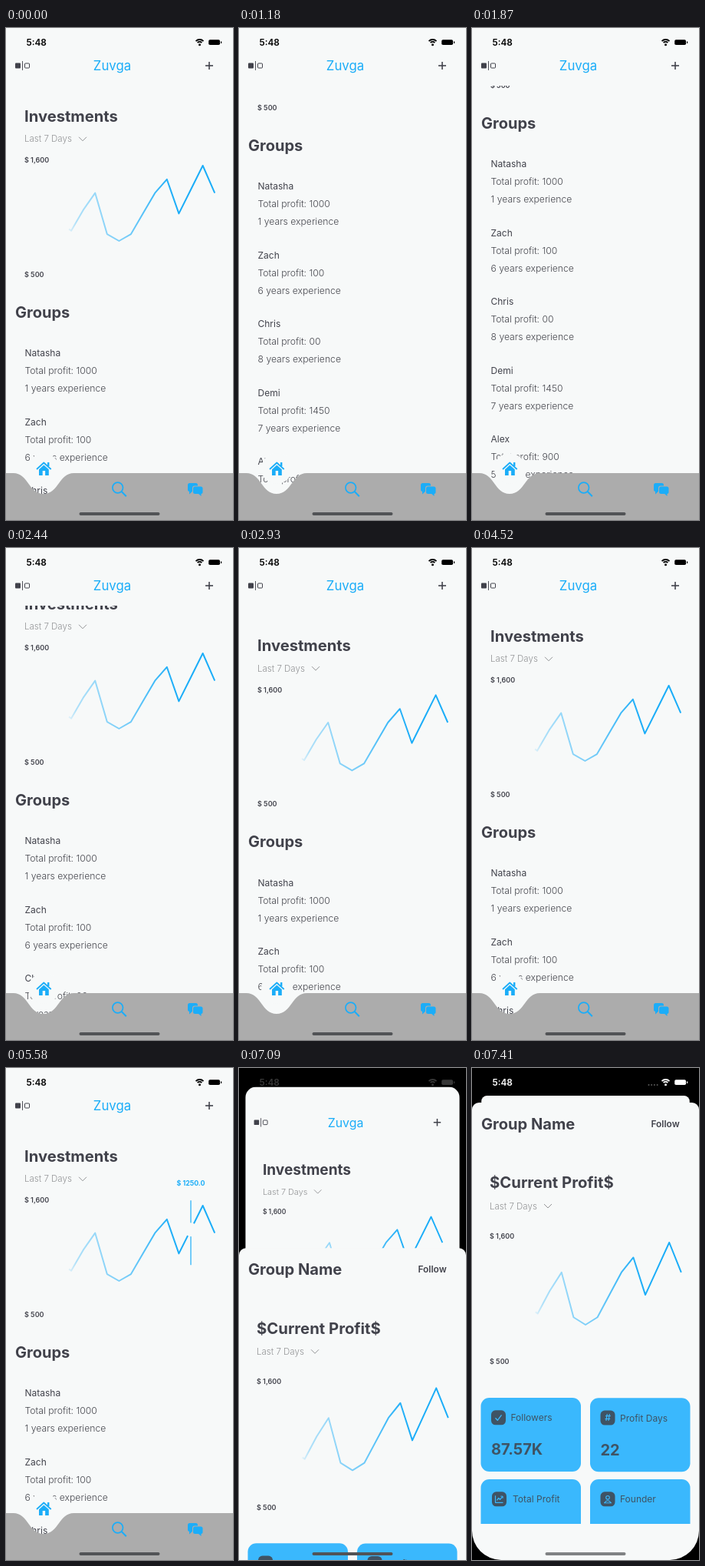
Write an HTML page with a canvas that moves like this. It is 296 px wide and 640 px high and loops after 8000 ms.

```html
<!DOCTYPE html>
<html lang="en">
<head>
<meta charset="utf-8">
<title>Investments</title>
<style>
  html, body { margin: 0; width: 100%; height: 100%; overflow: hidden; background: #f7f9f9; }
  canvas { display: block; width: 296px; height: 640px; }
</style>
</head>
<body>
<canvas></canvas>
<script>
const W = 296, H = 640, LOOP = 8000;
const BG = '#f7f9f9', BLUE = '#1badf8', DARK = '#41424b', BODY = '#45464d', GREY = '#939496';
const CARD = '#3ab8fd', SLATE = '#3f5364', BAR = '#acacac';

const canvas = document.querySelector('canvas');
const ctx = canvas.getContext('2d');
const ratio = window.devicePixelRatio || 1;
canvas.width = W * ratio;
canvas.height = H * ratio;

// Values plotted by both charts
const values = [650, 950, 1200, 600, 500, 600, 900, 1200, 1400, 900, 1250, 1600, 1200];

const people = [
  ['Natasha', '1000', 1], ['Zach', '100', 6], ['Chris', '00', 8],
  ['Demi', '1450', 7], ['Alex', '900', 5], ['Maria', '300', 4]
];

// Runs of picture updates: first time, last time, count
const ticks = [[0, 0, 1], [500, 1180, 7], [1300, 1640, 4], [1870, 2440, 6], [2570, 3380, 8],
  [3820, 4270, 5], [6990, 7090, 2], [7190, 7410, 3]]
  .flatMap(([a, b, n]) => Array.from({ length: n }, (_, i) => Math.round(a + (b - a) * i / Math.max(1, n - 1))));

const scrollKeys = [[390, 0], [500, 6], [730, 72], [950, 158], [1180, 217], [1300, 236], [1410, 246],
  [1640, 253], [1760, 253], [1870, 246], [2100, 170], [2440, 42], [2570, -10], [2700, -19],
  [2900, -13], [3150, -4], [3380, -1], [3820, -0.8], [4270, 0]];

// Time and index of the chart point under the finger; -1 hides it
const touches = [[0, -1], [4730, 0], [4980, 1], [5100, 2], [5260, 6], [5400, 8], [5580, 10], [5960, -1]];

const lerp = (a, b, k) => a + (b - a) * k;

function scrollAt(t) {
  const i = scrollKeys.findIndex(k => k[0] >= t);
  if (i <= 0) return 0;
  const [t0, a] = scrollKeys[i - 1], [t1, b] = scrollKeys[i];
  return lerp(a, b, (t - t0) / (t1 - t0));
}

// Critically damped spring
function sheetAt(t) {
  if (t < 6900) return 0;
  if (t >= 7410) return 1;
  const x = (t - 6900) * 0.0124;
  return 1 - (1 + x) * Math.exp(-x);
}

// y is the middle of the capitals
function text(str, x, y, size, weight, color, align = 'left') {
  ctx.font = `${weight} ${size}px Inter, sans-serif`;
  ctx.textAlign = align;
  ctx.fillStyle = color;
  ctx.fillText(str, x, y + size * 0.364);
}

function line(points, color, width) {
  ctx.beginPath();
  points.forEach(([x, y]) => ctx.lineTo(x, y));
  ctx.strokeStyle = color;
  ctx.lineWidth = width;
  ctx.stroke();
}

function box(x, y, w, h, r, color) {
  ctx.beginPath();
  ctx.roundRect(x, y, w, h, r);
  ctx.fillStyle = color;
  ctx.fill();
}

function disc(x, y, r, color) {
  ctx.beginPath();
  ctx.arc(x, y, r, 0, 7);
  ctx.fillStyle = color;
  ctx.fill();
}

function poly(points, color) {
  ctx.beginPath();
  points.forEach(([x, y]) => ctx.lineTo(x, y));
  ctx.fillStyle = color;
  ctx.fill();
}

function group(draw) {
  ctx.save();
  draw();
  ctx.restore();
}

function clipRect(x, y, w, h) {
  ctx.beginPath();
  ctx.rect(x, y, w, h);
  ctx.clip();
}

function chartPoint(i, floor, height) {
  return [85 + i * 15.6, floor - (values[i] - 500) / 1100 * height];
}

function chart(floor, height) {
  const fade = ctx.createLinearGradient(80, 0, 225, 0);
  [[0, 0.05], [0.08, 0.33], [0.26, 0.44], [0.55, 0.6], [0.9, 0.95], [1, 1]]
    .forEach(([at, a]) => fade.addColorStop(at, `rgba(27,173,248,${a})`));
  const points = values.map((_, i) => chartPoint(i, floor, height));
  line([[82, points[0][1] - 2], ...points], fade, 2);
}

function period(x, y) {
  text('Last 7 Days', x, y, 11.5, 300, GREY);
  line([[x + 71, y - 2.5], [x + 76, y + 2.5], [x + 81, y - 2.5]], GREY, 1);
}

function marker(i) {
  const [x, y] = chartPoint(i, 277, 98);
  line([[x, y - 38], [x, y + 46]], BLUE, 1.2);
  disc(x, y, 9, BG);
  text('$ ' + values[i].toFixed(1), x, y - 60.5, 8.8, 700, BLUE, 'center');
}

function content(touch) {
  text('Investments', 24, 114.2, 20.2, 700, DARK);
  period(24, 144.3);
  text('$ 1,600', 24, 172, 9, 600, DARK);
  text('$ 500', 24, 320.5, 9, 600, DARK);
  chart(277, 98);
  if (touch >= 0) marker(touch);
  text('Groups', 12, 369.5, 20, 700, DARK);
  people.forEach(([name, profit, years], i) => {
    const y = 422.9 + i * 89.5;
    text(name, 24.5, y, 12, 400, DARK);
    text('Total profit: ' + profit, 24.5, y + 23, 12.2, 300, BODY);
    text(years + ' years experience', 24.5, y + 46, 12.2, 300, BODY);
  });
}

function header() {
  box(12, 45.5, 7, 7, 1, DARK);
  line([[21.5, 43], [21.5, 55]], DARK, 0.9);
  ctx.strokeStyle = DARK;
  ctx.lineWidth = 1;
  ctx.beginPath();
  ctx.roundRect(24.5, 46, 6, 6, 1);
  ctx.stroke();
  text('Zuvga', 138.5, 49, 16.8, 400, BLUE, 'center');
  line([[260, 49], [270, 49]], DARK, 1.6);
  line([[265, 44], [265, 54]], DARK, 1.6);
}

function homeIcon() {
  disc(49, 573, 20, BG);
  line([[40, 574], [49.3, 565.5], [58.7, 574]], BLUE, 1.8);
  box(54, 565, 2.4, 5, 0, BLUE);
  poly([[43, 574.2], [49.3, 568.5], [55.8, 574.2], [55.8, 582], [43, 582]], BLUE);
  box(47.7, 576, 3.4, 6, 0, BG);
}

function tabBar() {
  ctx.beginPath();
  ctx.moveTo(0, 579);
  ctx.lineTo(9.5, 579);
  ctx.bezierCurveTo(29.2, 579, 29.2, 606, 49, 606);
  ctx.bezierCurveTo(68.8, 606, 68.8, 579, 88.5, 579);
  ctx.lineTo(W, 579);
  ctx.lineTo(W, H);
  ctx.lineTo(0, H);
  ctx.fillStyle = BAR;
  ctx.fill();
  homeIcon();

  ctx.beginPath();
  ctx.arc(145.7, 598, 6.8, 0, 7);
  ctx.strokeStyle = BLUE;
  ctx.lineWidth = 1.7;
  ctx.stroke();
  line([[150.7, 603], [156.8, 609.2]], BLUE, 2);

  box(237, 592, 13, 11, 2.5, BLUE);
  poly([[239, 602], [239, 606.5], [244, 602]], BLUE);
  box(243, 595.5, 14.5, 11.5, 3, BAR);
  box(244, 596.5, 12.5, 9.5, 2.5, BLUE);
  poly([[250, 605], [254.5, 609], [254.5, 605]], BLUE);
}

function app(scroll, touch) {
  ctx.fillStyle = BG;
  ctx.fillRect(0, 0, W, H);
  group(() => {
    clipRect(0, 75, W, H - 75);
    ctx.translate(0, -scroll);
    content(touch);
  });
  header();
  tabBar();
}

const glyphs = {
  check(x, y) { line([[x - 4, y + 0.5], [x - 1.2, y + 3.5], [x + 4, y - 3.5]], CARD, 1.3); },
  hash(x, y) { text('#', x, y, 12, 600, CARD, 'center'); },
  trend(x, y) {
    line([[x - 5, y - 4.5], [x - 5, y + 4.5], [x + 5, y + 4.5]], CARD, 1.2);
    line([[x - 3, y + 1.5], [x - 0.8, y - 1.5], [x + 1, y + 0.5], [x + 4.5, y - 3.5]], CARD, 1.2);
    line([[x + 1.8, y - 3.7], [x + 4.6, y - 3.7], [x + 4.6, y - 1]], CARD, 1);
  },
  person(x, y) {
    ctx.beginPath();
    ctx.arc(x, y - 2, 2.3, 0, 7);
    ctx.moveTo(x - 4.5, y + 5);
    ctx.quadraticCurveTo(x, y - 1, x + 4.5, y + 5);
    ctx.closePath();
    ctx.strokeStyle = CARD;
    ctx.lineWidth = 1.1;
    ctx.stroke();
  }
};

function tile(x, y, iconX, labelX, glyph, label, value) {
  box(x, y, 130.5, 96, 11, CARD);
  box(iconX, y + 16.3, 19, 19, 5.5, SLATE);
  glyphs[glyph](iconX + 9.5, y + 25.8);
  text(label, labelX, y + 26, 12, 400, SLATE);
  text(value, iconX, y + 67, 20, 700, SLATE);
}

// Drawn with its own top edge at zero
function sheet() {
  box(0, 0, W, 595, [9, 9, 38, 38], BG);
  text('Group Name', 12, 27.5, 20.1, 700, DARK);
  text('Follow', 233.5, 27.5, 11.9, 600, DARK);
  text('$Current Profit$', 23, 104, 20.3, 700, DARK);
  period(23, 134.5);
  text('$ 1,600', 23, 173.5, 9, 600, DARK);
  text('$ 500', 23, 337, 9, 600, DARK);
  group(() => {
    ctx.translate(0.6, 0);
    chart(289, 107);
  });
  group(() => {
    clipRect(0, 0, W, 548);
    tile(11.5, 384, 25, 50.5, 'check', 'Followers', '87.57K');
    tile(154, 384.3, 167.5, 193, 'hash', 'Profit Days', '22');
    tile(11.5, 490, 26, 53, 'trend', 'Total Profit', '12.4K');
    tile(154, 490, 167.5, 193, 'person', 'Founder', 'Zach');
  });
}

function statusBar(p) {
  const v = Math.round(255 * p ** 4);
  const color = `rgb(${v},${v},${v})`;
  text('5:48', 26.5, 18.8, 11.8, 600, color);
  if (p > 0.9) for (let i = 0; i < 4; i++) disc(230.5 + i * 3.7, 22, 1, '#5a5a5a');
  disc(252.5, 21.8, 1.5, color);
  ctx.strokeStyle = color;
  ctx.lineWidth = 1.8;
  for (const r of [4, 7]) {
    ctx.beginPath();
    ctx.arc(252.5, 22, r, -Math.PI * 0.75, -Math.PI * 0.25);
    ctx.stroke();
  }
  box(264.2, 15.2, 14.8, 6.8, 1.8, color);
  box(280, 17.2, 1.2, 2.8, 0.6, color);
}

function draw(time) {
  const t = ticks.filter(k => k <= time).pop();
  const touch = touches.filter(k => k[0] <= time).pop()[1];
  const p = sheetAt(t);

  ctx.setTransform(ratio, 0, 0, ratio, 0, 0);
  ctx.lineCap = 'butt';
  ctx.lineJoin = 'round';
  ctx.fillStyle = '#000';
  ctx.fillRect(0, 0, W, H);

  group(() => {
    if (p > 0) {
      const s = lerp(1, 0.918, p);
      ctx.translate(W / 2 * (1 - s), 36 * p);
      ctx.scale(s, s);
      ctx.beginPath();
      ctx.roundRect(0, 0, W, H, lerp(30, 8, p));
      ctx.clip();
    }
    app(scrollAt(t), touch);
  });
  if (p > 0) group(() => {
    ctx.translate(0, lerp(640, 45, p));
    sheet();
  });
  statusBar(p);
  box(95.5, 630, 105, 4, 2, p > 0.9 ? '#808284' : '#515356');
}

const start = performance.now();
function frame() {
  draw((performance.now() - start) % LOOP);
  requestAnimationFrame(frame);
}
frame();
</script>
</body>
</html>
```
